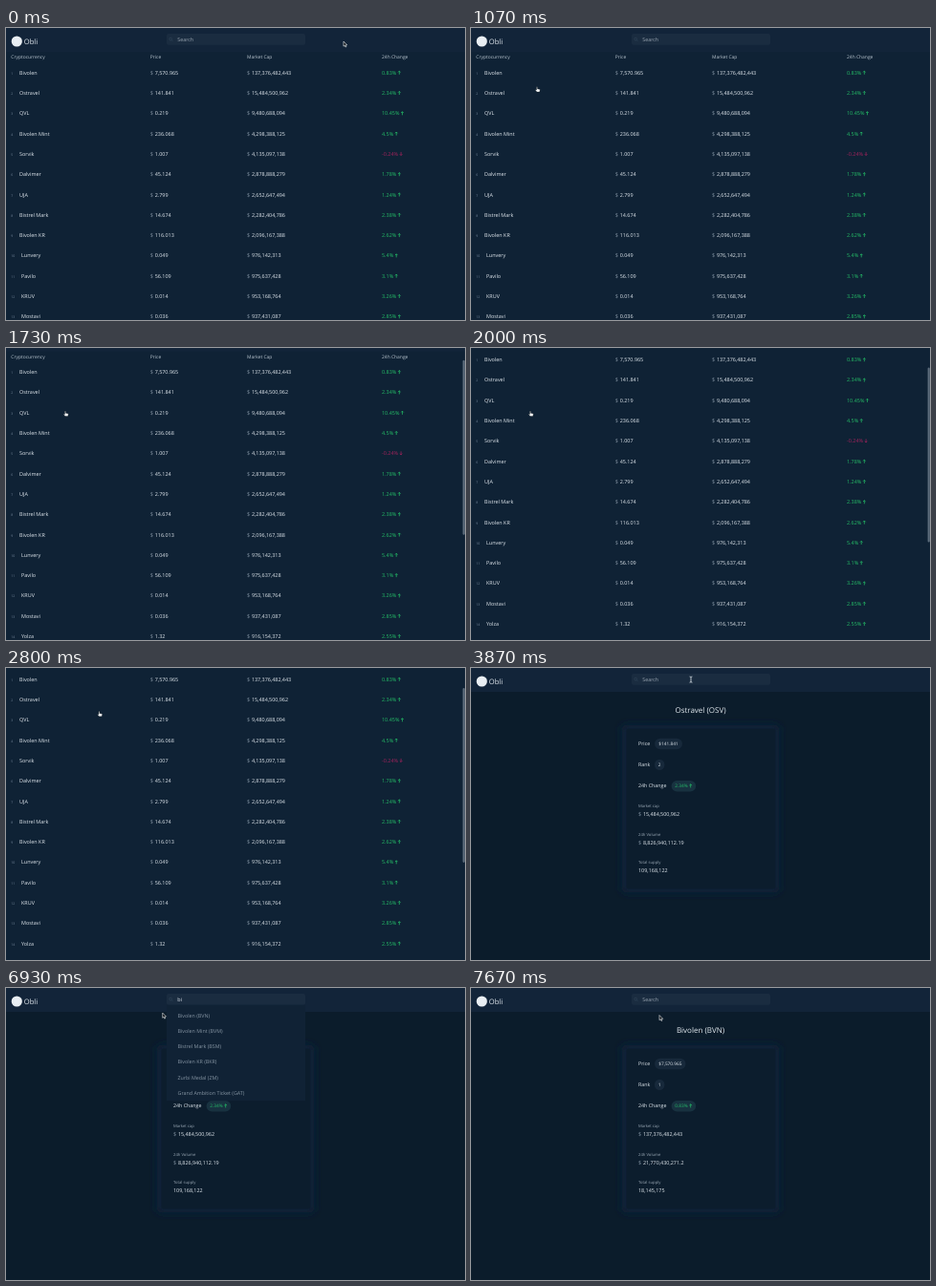
Animation, 480 px wide and 306 px high, one loop 9140 ms. Source, as an HTML page:

```html
<!DOCTYPE html>
<html lang="en">
<head>
<meta charset="utf-8">
<title>Crypto prices</title>
<style>
  html, body { margin: 0; width: 100%; height: 100%; overflow: hidden; background: #0b1c2b; }
  svg { display: block; width: 100%; height: 100%; }
  text { font: 5.45px 'Open Sans', sans-serif; fill: #e2e9ef; text-rendering: geometricPrecision; white-space: pre; }
  .brand { font-size: 7.6px; }
  .title { font-size: 8px; text-anchor: middle; }
  .head { font-size: 4.95px; fill: #b9c5cf; }
  .rank { font-size: 3.5px; fill: #74869a; }
  .sign { fill: #8494a4; }
  .label { font-size: 5.3px; }
  .small { font-size: 4.2px; fill: #9aa8b5; }
  .chip { font-size: 4.75px; }
  .item { font-size: 5.35px; fill: #8796a4; }
  .hint { font-size: 5.35px; fill: #99a5b1; }
  .up { fill: #25bf68; stroke: #25bf68; }
  .down { fill: #a3235c; stroke: #a3235c; }
  text.up, text.down { stroke: none; }
  path.up, path.down { fill: none; stroke-width: .75; }
</style>
</head>
<body>
<svg id="stage" viewBox="0 0 480 306" preserveAspectRatio="none" xmlns="http://www.w3.org/2000/svg"></svg>
<script>
const LOOP = 9140, ROW = 21.3;
const OPEN = 3000, FOCUS = 4730, TYPE = 5670, PICK = 7200;

const assets = [
  ['Bivolen', '7,570.965', '137,376,482,443', '0.83'],
  ['Ostravel', '141.841', '15,484,500,962', '2.34'],
  ['QVL', '0.219', '9,480,688,094', '10.45'],
  ['Bivolen Mint', '236.068', '4,298,388,125', '4.5'],
  ['Sorvik', '1.007', '4,135,097,138', '-0.24'],
  ['Dalvimer', '45.124', '2,878,888,279', '1.78'],
  ['UJA', '2.799', '2,652,647,494', '1.24'],
  ['Bistrel Mark', '14.674', '2,282,404,786', '2.38'],
  ['Bivolen KR', '116.013', '2,096,167,388', '2.62'],
  ['Lunvery', '0.049', '976,142,313', '5.4'],
  ['Pavilo', '56.109', '975,637,428', '3.1'],
  ['KRUV', '0.014', '953,168,764', '3.26'],
  ['Mostavi', '0.036', '937,431,087', '2.85'],
  ['Yolza', '1.32', '916,154,372', '2.55']
];
const matches = ['Bivolen (BVN)', 'Bivolen Mint (BVM)', 'Bistrel Mark (BSM)',
  'Bivolen KR (BKR)', 'Zurbi Medal (ZM)', 'Grand Ambition Ticket (GAT)'];

const text = (x, y, s, cls = '') => `<text x="${x}" y="${y}" class="${cls}">${s}</text>`;
const rect = (x, y, w, h, fill, rx = 0) =>
  `<rect x="${x}" y="${y}" width="${w}" height="${h}" rx="${rx}" fill="${fill}"/>`;
const money = (x, y, s) => text(x, y, '$', 'sign') + text(x + 4.9, y, s);

function change(x, y, value, size) {
  const down = value[0] === '-';
  const cls = down ? 'down' : 'up';
  const digits = value.replace(/\D/g, '').length;
  const width = size * (digits * .572 + (value.includes('.') ? .266 : 0) + (down ? .322 : 0) + .83);
  const flip = down ? ` translate(0 -3.8) scale(1 -1) translate(0 -3.8)` : '';
  return `<text x="${x}" y="${y}" class="${cls}" style="font-size:${size}px">${value}%</text>` +
    `<path class="${cls}" transform="translate(${x + width + 3} ${y - (down ? 0 : 4)})${flip}" ` +
    `d="M0 4V.4M-1.3 1.7L0 .4L1.3 1.7"/>`;
}

function row([name, price, cap, delta], i) {
  const y = 48.7 + i * ROW;
  return text(5.3, y, i + 1, 'rank') + text(i < 9 ? 14 : 16, y, name) +
    money(150.8, y, price) + money(252, y, cap) + change(393, y, delta, 5.45);
}

function details(id, title, rank, chipW, volume, supply) {
  const [, price, cap, delta] = assets[rank - 1];
  const chip = '#17293b';
  return `<g id="${id}">` +
    text(240, 47, title, 'title') +
    text(175, 81.4, 'Price', 'label') + rect(192, 73.7, chipW, 11.6, chip, 5.8) + text(196.3, 81.2, '$' + price, 'chip') +
    text(175, 103.2, 'Rank', 'label') + rect(192, 95.7, 10.4, 11.4, chip, 5.2) + text(195.8, 103.1, rank, 'chip') +
    text(175, 125.4, '24h Change', 'label') + rect(209.6, 118, 25.6, 11.4, '#183240', 5.7) + change(213.3, 125.4, delta, 4.75) +
    text(175, 146.4, 'Market cap', 'small') + money(175, 155, cap) +
    text(175, 175.9, '24h Volume', 'small') + money(175, 184.5, volume) +
    text(175, 205.4, 'Total supply', 'small') + text(175, 214, supply) + '</g>';
}

const header =
  rect(0, 0, 480, 25, '#122439') +
  '<circle cx="11.3" cy="14" r="5.6" fill="#e9eef3"/>' +
  text(18.8, 16.9, 'Obli', 'brand') +
  rect(168, 6, 145, 11.8, '#1a2c40', 2) +
  '<g fill="none" stroke="#33475b" stroke-width=".6"><circle cx="172.2" cy="11.6" r="1.4"/><path d="M173.2 12.6l1.2 1.2"/></g>';

document.getElementById('stage').innerHTML =
  '<defs><filter id="blur" x="-20%" y="-20%" width="140%" height="140%"><feGaussianBlur stdDeviation="4"/></filter></defs>' +
  rect(0, 0, 480, 306, '#0b1c2b') +
  '<g id="detail">' +
    `<g filter="url(#blur)">${rect(158, 60, 164, 175, '#10243a', 4)}</g>` +
    rect(162.5, 63.5, 156, 168, '#0c1d2d', 2) +
    details('first', 'Ostravel (OSV)', 2, 29, '8,826,940,112.19', '109,168,122') +
    details('second', 'Bivolen (BVN)', 1, 32.5, '21,770,430,271.2', '18,145,175') +
  '</g>' +
  '<g id="list">' + rect(0, 0, 480, 520, '#0f2235') +
    '<g id="gap"></g>' +
    assets.map(row).join('') + '</g>' +
  `<g id="header">${header}` +
    text(179.3, 13.9, 'Search', 'hint').replace('<text', '<text id="hint"') +
    '<text id="query" x="179.3" y="13.9"></text></g>' +
  '<g id="columns">' +
    text(5.3, 32.2, 'Cryptocurrency', 'head') + text(150.8, 32.2, 'Price', 'head') +
    text(252, 32.2, 'Market Cap', 'head') + text(393, 32.2, '24h Change', 'head') + '</g>' +
  '<g id="menu">' + rect(168, 17.8, 145, 100.4, '#102235') +
    matches.map((m, i) => text(179.5, 30.9 + i * 16.15, m, 'item')).join('') + '</g>' +
  '<path id="spinner" d="M2.3 0A2.3 2.3 0 1 1 0 -2.3" fill="none" stroke="#a9b6c2" stroke-width=".7"/>' +
  rect(0, 9, .7, 6, '#e2e9ef').replace('<rect', '<rect id="caret"') +
  rect(477.6, 0, 2.2, 183, '#5b6b7b', 1.1).replace('<rect', '<rect id="thumb"') +
  '<g id="cursor">' +
    '<path id="arrow" d="M0 0V5.2L1.2 4.1L2 6L2.9 5.6L2.1 3.8H3.7Z" fill="#0a0f14" stroke="#f2f5f7" stroke-width=".6"/>' +
    '<path id="hand" d="M-.5 .4Q0 -.2 .5 .4V2.2L2.9 2.8Q3.4 3 3.2 3.8L2.7 5.6H-.1L-1.8 3.6Q-1.8 2.8 -.5 3.4Z" fill="#f2f5f7" stroke="#0a0f14" stroke-width=".35"/>' +
    '<path id="beam" d="M-1.4 -3Q0 -3 0 -2.2Q0 -3 1.4 -3M0 -2.2V2.6M-1.4 3.2Q0 3.2 0 2.4Q0 3.2 1.4 3.2" fill="none" stroke="#dfe6ec" stroke-width=".8"/>' +
  '</g>';

const el = {};
document.querySelectorAll('[id]').forEach(n => el[n.id] = n);

const path = [[530, 353, 14], [1070, 69, 61.5], [1200, 47, 70], [1400, 62, 66],
  [2600, 62, 66], [2950, 120, 32], [3270, 229.5, 20.5], [3670, 229.5, 20.5], [3870, 230, 12],
  [6670, 230, 12], [6900, 162, 26], [7130, 197, 28.5]];
const scrolling = [[1470, 0], [1730, 21.5], [2000, 34.5], [2330, 35]];

const clamp = v => Math.max(0, Math.min(1, v));
const smooth = u => u * u * (3 - 2 * u);
const linear = u => u;

// Value of one column of a keyframe list at time t.
function track(keys, t, col, ease) {
  let i = 0;
  while (i < keys.length - 2 && t >= keys[i + 1][0]) i++;
  const a = keys[i], b = keys[i + 1];
  return a[col] + (b[col] - a[col]) * ease(clamp((t - a[0]) / (b[0] - a[0])));
}

const show = (node, on) => node.setAttribute('visibility', on ? 'visible' : 'hidden');
const move = (node, x, y) => node.setAttribute('transform', `translate(${x} ${y})`);

function caretOn(t) {
  if (t < FOCUS || t >= PICK) return false;
  if (t < TYPE) return t < 5270;
  return t < 6530 || t >= 7060;
}

function render(t) {
  const inList = t < OPEN;
  const scroll = inList ? track(scrolling, t, 1, linear) : 0;
  const shift = inList ? -scroll : 0;
  show(el.list, inList);
  show(el.columns, inList);
  show(el.detail, !inList);
  [el.list, el.header, el.columns].forEach(n => move(n, 0, shift));
  show(el.thumb, inList && t >= 1470);
  move(el.thumb, 0, scroll * .597);

  if (!inList) {
    el.first.setAttribute('opacity', t < 7130 ? clamp((t - OPEN) / 240) : clamp((7500 - t) / 120));
    el.second.setAttribute('opacity', clamp((t - 7560) / 110));
  }

  const typing = t >= TYPE && t < PICK;
  const query = !typing ? '' : t < 5800 ? 'b' : 'bi';
  el.query.textContent = query;
  el.hint.setAttribute('opacity', t >= 4870 && t < PICK ? 0 : 1);
  show(el.caret, caretOn(t));
  move(el.caret, query === 'bi' ? 184.6 : query ? 183.1 : 179.1, 0);

  const menu = t >= 5740 && t < PICK;
  show(el.menu, menu);
  show(el.spinner, menu && t < 6200);
  el.spinner.setAttribute('transform', `translate(307 12) rotate(${(t - 5870) * .5})`);

  const x = track(path, t, 1, smooth), y = track(path, t, 2, smooth);
  const overInput = x > 168 && x < 313 && y > 6 && y < 17.8 && scroll === 0;
  const overLink = inList ? y + scroll > 37 : menu && x > 168 && y >= 17.8;
  show(el.cursor, t < TYPE || t >= 6670);
  move(el.cursor, x, y);
  const shape = overInput ? 'beam' : overLink ? 'hand' : 'arrow';
  ['arrow', 'hand', 'beam'].forEach(s => el[s].setAttribute('display', s === shape ? 'inline' : 'none'));
}

const start = performance.now();
function tick() {
  render((performance.now() - start) % LOOP);
  requestAnimationFrame(tick);
}
render(0);
requestAnimationFrame(tick);
</script>
</body>
</html>
```
